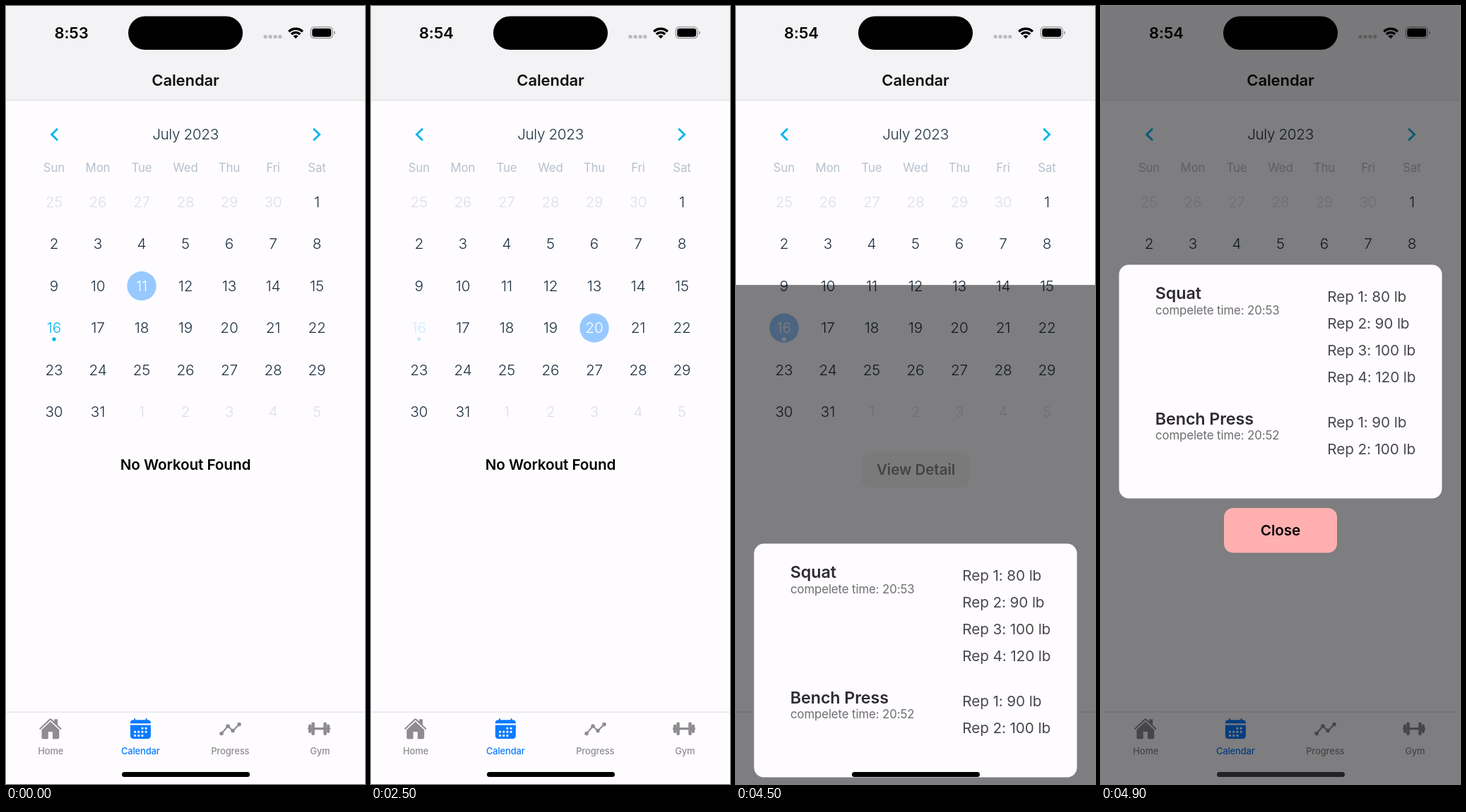
Write an HTML page that moves like this. It is 508x1102 px and loops after 8000 ms.

```html
<!DOCTYPE html>
<html lang="en">
<head>
<meta charset="utf-8">
<title>Workout calendar</title>
<style>
  html, body { margin: 0; width: 100%; height: 100%; overflow: hidden; background: #fefcff; }
  svg { display: block; width: 100%; height: 100%; }
  text { font-family: Inter, "Open Sans", sans-serif; letter-spacing: -.1px; white-space: pre; }
</style>
</head>
<body>
<svg id="stage" viewBox="0 0 508 1102">
  <rect width="508" height="1102" fill="#fefcff"/>
  <rect width="508" height="133" fill="#f3f2f5"/>
  <rect y="133" width="508" height="1" fill="#e0dfe2"/>

  <g id="status">
    <g fill="#bbb9bc">
      <rect x="364.5" y="41" width="5" height="5" rx="1.8"/>
      <rect x="371.5" y="41" width="5" height="5" rx="1.8"/>
      <rect x="378.5" y="41" width="5" height="5" rx="1.8"/>
      <rect x="385.3" y="41" width="5" height="5" rx="1.8"/>
    </g>
    <g fill="none" stroke="#000" stroke-width="3.4">
      <path d="M400.2 36.2a14 14 0 0 1 19.6 0"/>
      <path d="M403.8 40a9 9 0 0 1 12.4 0"/>
    </g>
    <path d="M410 46.3l-3.6-3.7a5.2 5.2 0 0 1 7.2 0z"/>
    <rect x="431.2" y="29.7" width="31" height="16" rx="5" fill="none" stroke="#98969a" stroke-width="1.3"/>
    <rect x="433.2" y="31.7" width="27" height="12" rx="3.4"/>
    <path d="M464 35.2q2 .8 2 2.6t-2 2.6z" fill="#98969a"/>
  </g>

  <g fill="none" stroke="#0bb4ee" stroke-width="2.9" stroke-linecap="square">
    <path d="M72 174.7L64.6 182L72 189.3"/>
    <path d="M436.2 174.7L443.6 182L436.2 189.3"/>
  </g>
  <g id="month"></g>
  <g id="detail">
    <rect x="178" y="632" width="152" height="50" rx="11" fill="#f0eeef"/>
  </g>

  <g id="tabs">
    <rect y="999.5" width="508" height="1.2" fill="#e4e2e5"/>
    <g fill="#8e8c8f" transform="translate(46.3 1007.2) scale(.0647)">
      <path d="M256 98L64 280V448a32 32 0 0 0 32 32H192a16 16 0 0 0 16-16V320h96v144a16 16 0 0 0 16 16h96a32 32 0 0 0 32-32V280z"/>
      <path d="M336 48h80v140l-80-76z"/>
      <path d="M32 256L240 57q16-14 32 0L480 256" fill="none" stroke="#8e8c8f" stroke-width="32" stroke-linecap="round"/>
    </g>
    <g fill="#0a7bff" transform="translate(173.8 1007) scale(.0647)">
      <path d="M480 144V128a64 64 0 0 0-64-64H400V48a16 16 0 0 0-32 0V64H144V48a16 16 0 0 0-32 0V64H96a64 64 0 0 0-64 64v16z"/>
      <path d="M32 176H480V416a64 64 0 0 1-64 64H96a64 64 0 0 1-64-64z"/>
      <path d="M296 248h0M376 248h0M136 328h0M216 328h0M296 328h0M376 328h0M136 408h0M216 408h0M296 408h0"
        stroke="#fefcff" stroke-width="50" stroke-linecap="round"/>
    </g>
    <g fill="none" stroke="#8e8c8f" stroke-linecap="round">
      <path d="M305 1030.5L314 1020L321 1026.5L330 1017.5" stroke-width="2.1"/>
      <path d="M305 1030.5h0M314 1020h0M321 1026.5h0M330 1017.5h0" stroke-width="5.6"/>
    </g>
    <g fill="#8e8c8f">
      <rect x="427" y="1022" width="32" height="3.2" rx="1.4"/>
      <rect x="428" y="1017.5" width="4" height="12.4" rx="1.8"/>
      <rect x="432.2" y="1014.5" width="4.6" height="18.4" rx="2"/>
      <rect x="449.2" y="1014.5" width="4.6" height="18.4" rx="2"/>
      <rect x="454" y="1017.5" width="4" height="12.4" rx="1.8"/>
    </g>
  </g>

  <g id="modal">
    <rect width="508" height="1104" fill="#000" fill-opacity=".5"/>
    <rect x="25.5" y="366.5" width="457" height="331" rx="14" fill="#fefcff"/>
    <rect x="174" y="711" width="160" height="63.5" rx="13" fill="#ffafb0"/>
  </g>
  <rect x="173" y="14.5" width="162" height="47.5" rx="23.7"/>
  <rect id="homeBar" x="164" y="1085" width="181" height="7" rx="3.5"/>
</svg>
<script>
const LOOP = 8000;
const INK = '#1f3242', BLUE = '#0bb4ee', PALE = '#dddfe2', GRAY = '#8e8c8f';
const $ = id => document.getElementById(id);

function add(parent, tag, attrs) {
  const el = document.createElementNS('http://www.w3.org/2000/svg', tag);
  for (const key in attrs) el.setAttribute(key, attrs[key]);
  return parent.appendChild(el);
}

function label(parent, str, x, y, size, weight, fill, anchor = 'middle') {
  const el = add(parent, 'text', { x, y, fill, 'font-size': size, 'font-weight': weight, 'text-anchor': anchor });
  el.textContent = str;
  return el;
}

const clock = label($('status'), '8:53', 92.5, 46, 22, 600, '#000');
label($('status'), 'Calendar', 254, 112.5, 22, 600, '#111');

// Month grid: cell 0 is Sunday, June 25
const month = $('month');
label(month, 'July 2023', 254, 189.2, 20.7, 300, INK).style.letterSpacing = '-.35px';
['Sun', 'Mon', 'Tue', 'Wed', 'Thu', 'Fri', 'Sat'].forEach((name, i) =>
  label(month, name, 68 + 62 * i, 235.4, 16.8, 400, '#b6c1cd'));

const days = {};
for (let i = 0; i < 42; i++) {
  const day = i - 5, x = 68 + 62 * (i % 7), y = 277.5 + 59.5 * Math.floor(i / 7);
  const inMonth = day > 0 && day < 32;
  const g = add(month, 'g', {});
  const disc = add(g, 'circle', { cx: x, cy: y, r: 20.7, fill: '#97c9ff' });
  const color = !inMonth ? PALE : day === 16 ? BLUE : INK;
  const num = label(g, inMonth ? day : day < 1 ? day + 30 : day - 31, x, y + 7.3, 20.7, 300, color);
  const dot = day === 16 && add(g, 'circle', { cx: x, cy: y + 16, r: 2.7 });
  disc.style.display = 'none';
  if (inMonth) days[day] = { g, disc, num, dot, color };
}

const empty = label($('stage'), 'No Workout Found', 254, 657.2, 20.7, 600, '#000');
$('stage').insertBefore(empty, $('detail'));
label($('detail'), 'View Detail', 254.5, 663.5, 20.7, 600, '#000');

['Home', 'Calendar', 'Progress', 'Gym'].forEach((name, i) =>
  label($('tabs'), name, 63.3 + 127 * i, 1059.7, 12.9, 500, i === 1 ? '#0a7bff' : GRAY));

function exercise(name, time, y, weights) {
  const modal = $('modal');
  label(modal, name, 76.8, y, 23.3, 600, '#2f2c31', 'start');
  label(modal, 'compelete time: ' + time, 77, y + 21.5, 16.8, 400, '#6f6d70', 'start');
  weights.forEach((lb, i) =>
    label(modal, `Rep ${i + 1}: ${lb} lb`, 320.3, y + 4 + 38 * i, 20.7, 400, '#4a484c', 'start'));
}
exercise('Squat', '20:53', 415, [80, 90, 100, 120]);
exercise('Bench Press', '20:52', 592.7, [90, 100]);
label($('modal'), 'Close', 254, 750, 20.7, 600, '#000');

// Touch feedback: dims to 20 % while held, eases back after release
function touch(t, press, release) {
  if (t < press) return 1;
  if (t < release) return .2;
  const p = Math.min(1, (t - release) / 250);
  return .2 + .8 * (p < .5 ? 2 * p * p : 1 - 2 * (1 - p) ** 2);
}

// Critically damped slide from the bottom edge
function slide(t) {
  if (t >= 4900) return 0;
  const s = .0179 * (t - 4378);
  return 1102 * (1 + s) * Math.exp(-s);
}

const taps = [
  { day: 6, press: 500, release: 800 },
  { day: 20, press: 1400, release: 1660 },
  { day: 16, press: 2500, release: 2800 }
];
const show = (el, on) => { el.style.display = on ? '' : 'none'; };

function draw(t) {
  let selected = 11;
  for (const { day, press, release } of taps) {
    if (t >= release) selected = day;
    days[day].g.setAttribute('opacity', touch(t, press, release));
  }
  for (const day in days) {
    const { disc, num, dot, color } = days[day], on = +day === selected;
    show(disc, on);
    num.setAttribute('fill', on ? '#fff' : color);
    if (dot) dot.setAttribute('fill', on ? '#fff' : color);
  }
  clock.textContent = t < 1400 ? '8:53' : '8:54';
  show(empty, selected !== 16);
  show($('detail'), selected === 16);
  $('detail').setAttribute('opacity', touch(t, 4100, 4400));
  show($('modal'), t >= 4400);
  $('modal').setAttribute('transform', `translate(0 ${slide(t).toFixed(1)})`);
  $('homeBar').setAttribute('fill', t < 4600 ? '#000' : '#222123');
}

const start = performance.now();
function tick() {
  const t = (performance.now() - start) % LOOP;
  draw(Math.floor(t / 100) * 100);
  requestAnimationFrame(tick);
}
tick();
</script>
</body>
</html>
```
